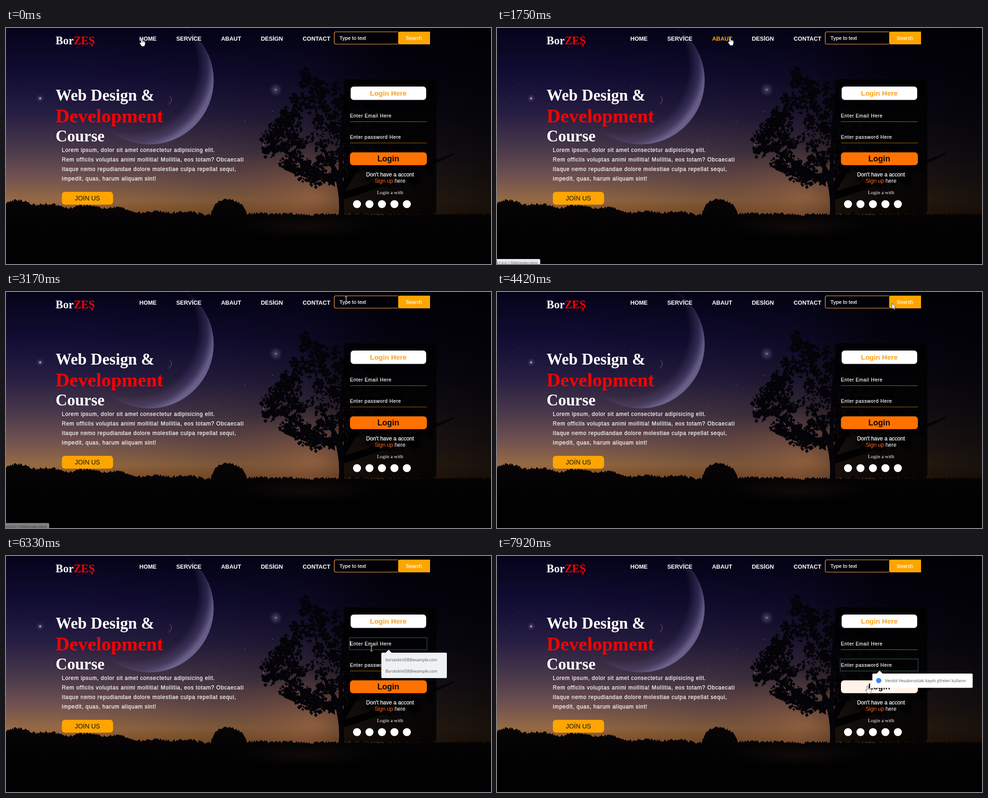
An HTML page for the animation above (8000 ms loop, 1066 px wide and 520 px high).

```html
<!DOCTYPE html>
<html lang="en">
<head>
<meta charset="utf-8">
<title>Web design course</title>
<style>
  html, body { margin: 0; width: 100%; height: 100%; overflow: hidden; background: #000; }
  svg { display: block; width: 1066px; height: 520px; }
  text { font-family: "Liberation Sans", Arial, sans-serif; fill: #fff; white-space: pre; }
  .serif { font-family: "Liberation Serif", "Times New Roman", serif; }
  .ui { font-family: "Open Sans", "Noto Sans", sans-serif; fill: #555; }
  .bold { font-weight: bold; }
  .firm { stroke: #fff; stroke-width: .25; }
  .mid { text-anchor: middle; }
</style>
</head>
<body>
<svg id="stage" viewBox="0 0 1066 520" xmlns="http://www.w3.org/2000/svg"></svg>
<script>
const LOOP = 8000, STEP = 1000 / 12;
const ORANGE = [255, 165, 0], WHITE = [255, 255, 255], DEEP = [255, 114, 0];

// Seeded random numbers keep the scenery identical on every load.
let seed = 11;
const rnd = () => (seed = (seed * 16807) % 2147483647) / 2147483647;
const between = (a, b) => a + (b - a) * rnd();
const clamp = v => Math.max(0, Math.min(1, v));
const ramp = (t, start, length) => clamp((t - start) / length);
const smooth = k => k * k * (3 - 2 * k);
const mix = (a, b, k) => `rgb(${a.map((v, i) => Math.round(v + (b[i] - v) * k))})`;

const text = (x, y, size, str, attrs = '') =>
  `<text x="${x}" y="${y}" font-size="${size}" ${attrs}>${str}</text>`;
const rect = (x, y, w, h, fill, attrs = '') =>
  `<rect x="${x}" y="${y}" width="${w}" height="${h}" fill="${fill}" ${attrs}/>`;
const circle = (x, y, r, fill, attrs = '') =>
  `<circle cx="${x}" cy="${y}" r="${r}" fill="${fill}" ${attrs}/>`;
const stops = list => list.map(([o, c, a = 1]) =>
  `<stop offset="${o}" stop-color="${c}" stop-opacity="${a}"/>`).join('');

function starField() {
  let out = '';
  for (let i = 0; i < 120; i++) {
    const r = .3 + 1.2 * rnd() ** 7;
    out += circle(between(0, 1066).toFixed(1), between(0, 270).toFixed(1), r.toFixed(2),
      '#b0a9c8', `opacity="${between(.15, .55).toFixed(2)}"`);
  }
  return out;
}

// Leaves gather in clusters; the crown widens down to y = 268, then closes towards the trunk.
function crown() {
  let d = '';
  for (let i = 0; i < 190; i++) {
    const y = 88 + 252 * Math.sqrt(rnd()), size = between(8, 19);
    const left = y < 268 ? 652 - 98 * ((y - 88) / 180) ** 1.4 : 554 + (y - 268) * 1.7;
    const right = y < 268 ? 700 + 230 * (y - 88) / 180 : 985 - (y - 268);
    const x = left + (right - left) * rnd() ** 1.5;
    for (let j = 0; j < 18; j++) {
      const a = rnd() * Math.PI * 2, q = Math.sqrt(rnd()) * size, r = between(1.5, 4.5);
      d += `M${(x + Math.cos(a) * q - r).toFixed(1)} ${(y + Math.sin(a) * q * .8).toFixed(1)}` +
        `l${r.toFixed(1)} ${(-r).toFixed(1)} ${r.toFixed(1)} ${r.toFixed(1)} ${(-r).toFixed(1)} ${(r * 1.2).toFixed(1)}z`;
    }
  }
  return d;
}

// Tree tops slope down to the right, with one round clump near the middle.
function ridge() {
  let d = 'M0 520';
  for (let x = 0; x <= 1066; x += 2) {
    const slope = 386 + 24 * smooth(clamp(x / 480));
    const bumps = 7 * Math.sin(x / 17) * Math.sin(x / 41 + 1) * (1 - clamp(x / 900));
    const clump = 33 * Math.sqrt(clamp(1 - ((x - 490) / 39) ** 2));
    d += `L${x} ${(slope - bumps - clump + between(-3, 3)).toFixed(1)}`;
  }
  return d + 'L1066 520z';
}

const scenery = () => `<defs>
    <linearGradient id="sky" x2="0" y2="1">${stops([[0, '#04031a'], [.2, '#120d34'], [.36, '#261d42'],
      [.52, '#4c3a4c'], [.64, '#745450'], [.73, '#966a44'], [.78, '#8c582e']])}</linearGradient>
    <linearGradient id="shade">${stops([[.1, '#000', 0], [.45, '#000', .18],
      [.62, '#000', .3], [.78, '#000', .72], [1, '#000', .84]])}</linearGradient>
    <linearGradient id="land" x2="0" y2="1">${stops([[0, '#080507'], [.6, '#010101']])}</linearGradient>
    <radialGradient id="moon" gradientUnits="userSpaceOnUse" cx="275" cy="85" r="186">${stops([[.78, '#5c5284', 0],
      [.9, '#5c5284', .4], [.98, '#7d75a2', .75]])}</radialGradient>
    <radialGradient id="halo">${stops([[0, '#cfc6dc', .8], [.18, '#8c80a4', .4], [1, '#6a5f88', 0]])}</radialGradient>
    <radialGradient id="glow">${stops([[0, '#b8764e', .5], [1, '#8a5a48', 0]])}</radialGradient>
  </defs>
  ${rect(0, 0, 1066, 520, 'url(#sky)')}
  ${rect(0, 0, 1066, 520, 'url(#shade)')}
  ${starField()}
  ${circle(315, 115, 141.5, 'url(#moon)')}
  <path d="M359 150a10 10 0 0 1 -3 18" fill="none" stroke="#6c648c"/>
  ${circle(75, 155, 9, 'url(#halo)')}${circle(75, 155, 1.8, '#c9c8e6')}
  ${circle(593, 136, 15, 'url(#halo)')}
  <ellipse cx="680" cy="370" rx="230" ry="120" fill="url(#glow)"/>
  <path d="${crown()}" fill="#040308"/>
  <path d="M729 432Q738 380 722 325L690 255L694 253L731 318L738 180L743 180L739 340L790 275L794 278L744 362Q740 395 748 432z
    M722 335Q670 300 590 255L588 258Q670 315 723 350zM742 360Q850 330 985 275L987 278Q850 345 742 378z" fill="#040308"/>
  <path d="${ridge()}" fill="url(#land)"/>
  <ellipse cx="660" cy="438" rx="150" ry="28" fill="url(#glow)" opacity=".15"/>`;

const links = ['HOME', 'SERVİCE', 'ABAUT', 'DESİGN', 'CONTACT'];
const copy = ['Lorem ipsum, dolor sit amet consectetur adipisicing elit.',
  'Rem officiis voluptas animi mollitia! Mollitia, eos totam? Obcaecati',
  'itaque nemo repudiandae dolore molestiae culpa repellat sequi,', 'impedit, quas, harum aliquam sint!'];

const field = (y, label) => text(756, y, 10.55, label, 'class="firm" letter-spacing=".703"') +
  rect(756, y + 8.8, 169, 1, '#ffa500', 'opacity=".65"');

function page() {
  return text(109, 35.5, 24.6, 'Bor<tspan fill="#f00">ZEŞ</tspan>', 'class="serif bold"') +
    links.map((s, i) => text(0, 27.5, 12.67, s, `id="link${i}" class="bold"`)).join('') +
    `<path d="M862 8.5H725a3.5 3.5 0 0 0 -3.5 3.5V32a3.5 3.5 0 0 0 3.5 3.5H862" fill="#000" fill-opacity=".3" stroke="#ffa94d" stroke-width="1.2"/>` +
    text(733, 26, 11.25, 'Type to text', 'class="firm"') +
    `<path d="M932 8H865.5a3.5 3.5 0 0 0 -3.5 3.5V32.5a3.5 3.5 0 0 0 3.5 3.5H932z" fill="#ffa500"/>` +
    text(896.5, 26, 11.25, 'Search', 'class="mid firm"') +
    text(109, 160, 35.2, 'Web Design &amp;', 'class="serif bold"') +
    text(109, 208, 42.2, 'Development', 'class="serif bold" style="fill:#f00"') +
    text(109, 250, 35.2, 'Course', 'class="serif bold"') +
    copy.map((s, i) => text(122.8, 273 + i * 21.1, 11.97, s, 'class="firm" letter-spacing=".75"')).join('') +
    rect(122.8, 361, 112.5, 28.2, '#ffa500', 'rx="6.5"') +
    text(179, 380.3, 14.06, 'JOİN US', 'class="mid" style="fill:#111"') +
    rect(742, 113, 204, 296.5, '#000', 'fill-opacity=".78" rx="7"') +
    rect(757.5, 129, 166, 29.5, '#fff', 'rx="6.5"') +
    text(840.3, 149, 15.46, 'Login Here', 'class="mid bold" style="fill:#ffa114"') +
    field(197, 'Enter Email Here') + field(244, 'Enter password Here') +
    rect(754.5, 0, 171, 26.5, 'none', 'id="focus" stroke="#1c3538" stroke-width="2"') +
    rect(756, 0, 1, 11, '#fff', 'id="caret"') +
    rect(756, 274, 169, 28.2, '#ff7200', 'id="login" rx="7"') +
    text(840.3, 294, 17.6, 'Login', 'class="mid bold" style="fill:#0c0606"') +
    text(844, 327, 11.95, "Don't have a accont", 'class="mid firm"') +
    text(844, 341.3, 11.95, '<tspan fill="#ff6a1f">Sign up</tspan> here', 'class="mid"') +
    text(844, 366, 11.3, 'Login a with', 'class="mid serif"') +
    [0, 1, 2, 3, 4].map(i => circle(771.5 + i * 27.4, 388, 8.8, '#fff')).join('');
}

const bubble = (y, w, h, fill) => rect(825, y, w, h, fill, 'rx="2.5"') +
  `<path d="M834 ${y + .5}l7 -7 7 7z" fill="${fill}"/>`;

function overlays() {
  return `<g id="mails">${bubble(213, 144, 56, '#f0f1f5')}
      ${text(834, 232, 8.6, 'borzeskirti58@example.com', 'class="ui"')}
      ${text(834, 257, 8.6, 'Borzeskirti58@example.com', 'class="ui"')}</g>
    <g id="saved">${bubble(259, 220.5, 31.5, '#fff')}
      ${circle(839, 274.5, 5.8, '#4285f4')}
      ${text(853, 278, 8.65, 'Vendol Hesabınızdaki kayıtlı şifreleri kullanın', 'class="ui"')}</g>
    <g id="status"><path d="M0 509H92a3 3 0 0 1 3 3V520H0z" fill="#e9e7ec"/>
      ${text(89, 519.5, 7.8, '127.0.0.1:5500/index.html', 'class="ui" text-anchor="end"')}</g>
    <path id="arrow" d="M0 0V12.5L2.8 9.9 4.7 14.1 6.7 13.2 4.9 9.1H8.8z" fill="#fff" stroke="#222" stroke-width=".7"/>
    <path id="hand" d="M-1.5 .8Q0 -.8 1.5 .8V5.5Q3 4.6 4 6Q5.5 5.3 6.2 6.7Q7.8 6.3 8 8V12Q7.8 14 6.5 15.5V17.5H-.5V16Q-2.5 13.5 -4.3 10.5Q-4.5 8.5 -2.8 9.2L-1.5 10.3z
      M1.5 5.5V9M4 6.5V9M6.2 7V9.5" fill="#fff" stroke="#222" stroke-width=".7"/>
    <path id="beam" d="M-2.3 -5.5H-.6L0 -5 .6 -5.5H2.3M0 -5V5M-2.3 5.5H-.6L0 5 .6 5.5H2.3" fill="none" stroke="#fff"
      stroke-width="1.1" style="mix-blend-mode:difference"/>`;
}

const stage = document.getElementById('stage');
stage.innerHTML = scenery() + page() + overlays();
const el = id => document.getElementById(id);
const fade = (id, k) => el(id).setAttribute('opacity', k);

// Lay the menu out from the measured words with an even gap.
let menuX = 293;
const areas = links.map((_, i) => {
  const node = el('link' + i), left = menuX, width = node.getComputedTextLength();
  node.setAttribute('x', left);
  menuX += width + 43.2;
  return [left, 12, left + width, 32];
});
const loginArea = [756, 274, 925, 302];
const typingAreas = [[721, 8, 861, 36], [757, 129, 923, 158], [756, 180, 925, 207], [756, 226, 925, 254]];

// Where the pointer rests: time, x, y; it eases from one to the next.
const route = [[0, 298, 23], [1750, 512, 21], [3170, 747.5, 16], [3500, 752, 17], [4420, 868, 25],
  [5420, 845, 152], [6000, 802, 194], [7170, 808, 243], [7920, 814.5, 285.5], [LOOP, 814.5, 285.5]];

function pointer(t) {
  const i = Math.max(1, route.findIndex(p => p[0] > t));
  const [t0, x0, y0] = route[i - 1], [t1, x1, y1] = route[i];
  const k = smooth(ramp(t, t0, t1 - t0));
  return [x0 + (x1 - x0) * k, y0 + (y1 - y0) * k];
}

const inside = ([x, y], [l, t, r, b]) => x >= l && x <= r && y >= t && y <= b;

// A hover colour fades over 300 ms: the share of that time spent on the area.
function hover(t, area) {
  let hits = 0;
  for (let back = 0; back < 300; back += 25) {
    if (t - back > 0 && inside(pointer(t - back), area)) hits++;
  }
  return hits / 12;
}

function shapeAt(point) {
  const over = area => inside(point, area);
  if (areas.some(over) || over(loginArea)) return 'hand';
  return typingAreas.some(over) ? 'beam' : 'arrow';
}

function draw(now) {
  const t = Math.floor((now % LOOP) / STEP + .05) * STEP;
  areas.forEach((area, i) => {
    el('link' + i).style.fill = mix(WHITE, ORANGE, hover(t, area) * .95);
  });
  el('login').setAttribute('fill', mix(DEEP, WHITE, hover(t, loginArea)));
  fade('status', ramp(t, 160, 160) * (1 - ramp(t, 3030, 300)));

  const onPassword = t >= 7060, focused = t >= 6160, top = onPassword ? 227 : 180;
  el('focus').setAttribute('y', top);
  el('caret').setAttribute('y', top + 7);
  fade('focus', +focused);
  fade('caret', +(focused && (t - (onPassword ? 7060 : 6160)) % 1000 < 500));
  fade('mails', ramp(t, 6160, 160) * (1 - ramp(t, 7140, 240)));
  fade('saved', ramp(t, 7000, 120));

  const point = pointer(t), shape = shapeAt(point);
  for (const id of ['arrow', 'hand', 'beam']) {
    el(id).setAttribute('transform', `translate(${point.map(v => v.toFixed(1))})`);
    fade(id, +(id === shape));
  }
}

const begin = performance.now();
function tick() {
  draw(performance.now() - begin);
  requestAnimationFrame(tick);
}
tick();
</script>
</body>
</html>
```
